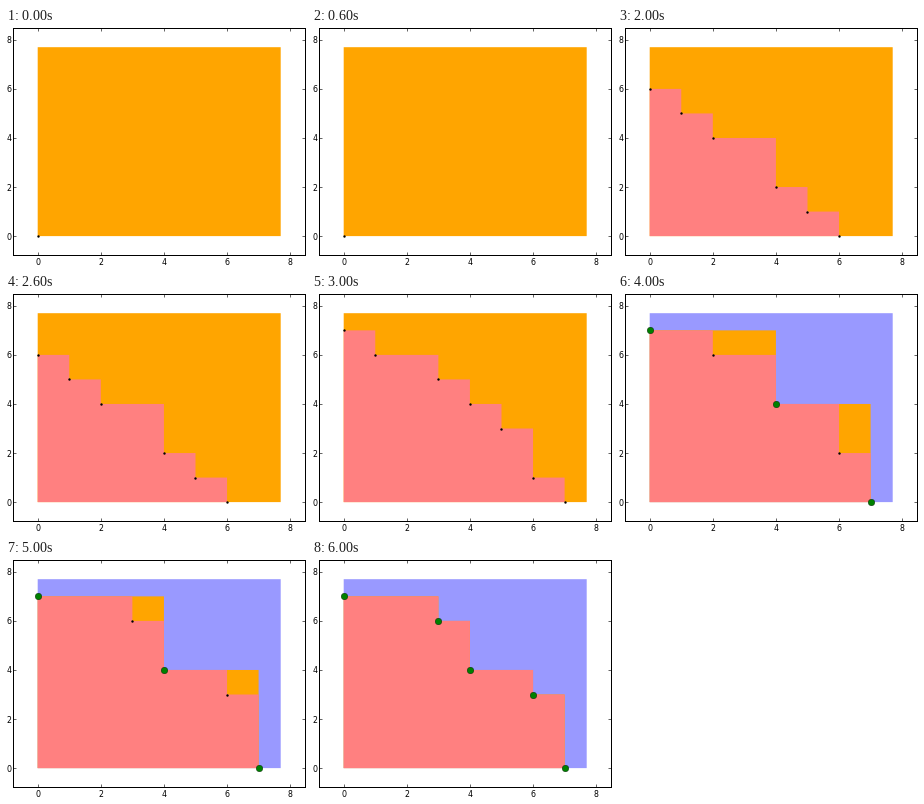
Animation of 300x238 px, one loop 7000 ms. Source, as a matplotlib script:

```python
import matplotlib.pyplot as plt
from matplotlib.animation import FuncAnimation

W, H, DPI = 300, 238, 64
PX = 72 / DPI  # points per pixel
SIZE = 7.7
STEPS = 7
ORANGE, PINK, BLUE = "orange", "#ff8080", "#9999ff"
LEFT, RIGHT, TOP, BOTTOM = 7.4, 299, 0.3, 227  # axes edges in pixels

plt.rcParams["font.family"] = "DejaVu Sans"
fig = plt.figure(figsize=(W / DPI, H / DPI), dpi=DPI, facecolor="white")
ax = fig.add_axes([LEFT / W, 1 - BOTTOM / H,
                   (RIGHT - LEFT) / W, (BOTTOM - TOP) / H])
ax.set(xlim=(-0.1 * SIZE, 1.1 * SIZE), ylim=(-0.1 * SIZE, 1.1 * SIZE),
       xticks=range(0, 9, 2), yticks=range(0, 9, 2))
ax.tick_params(direction="in", top=True, right=True, length=2.6 * PX,
               width=0.6 * PX, pad=2.6 * PX, labelsize=7.85 * PX)
ax.tick_params(axis="y", pad=2 * PX)
for spine in ax.spines.values():
    spine.set_linewidth(PX)


def region(color, z):
    return ax.fill([0, SIZE, SIZE, 0], [0, 0, SIZE, SIZE],
                   color=color, lw=0, zorder=z, snap=False)[0]


def dots(color, size, edge=0):
    return ax.plot([], [], "o", color=color, ms=size * PX, mew=edge * PX,
                   mec="black", zorder=5, clip_on=False)[0]


def mirror(half):
    """Complete a front that is symmetric about the diagonal."""
    return sorted(set(half) | {(y, x) for x, y in half})


def front(step):
    """Lower bound: a rising diagonal, then a corner sliding to the right."""
    if step < 3:
        total = (0, 4, 6)[step]
        return mirror([(x, total - x) for x in range(min(total // 2, 2) + 1)])
    half = [(0, 7), (min(step - 2, 3), 6), (4, 4)]
    if step == 3:
        half.append((3, 5))
    return mirror(half)


def optimal(step):
    """Points already proven to lie on the final front."""
    if step < 4:
        return []
    return front(step) if step == STEPS - 1 else mirror([(0, 7), (4, 4)])


def stairs(points):
    """Outline of the area below a descending staircase."""
    outline = [(0, 0)]
    for (x, y), (x_next, _) in zip(points, points[1:]):
        outline += [(x, y), (x_next, y)]
    return outline + [(points[-1][0], 0)]


square = region(ORANGE, 1)
between = region(ORANGE, 2)
below = region(PINK, 3)
open_dots = dots("black", 2.4)
done_dots = dots("green", 6.6, 0.33)


def draw(step):
    lower, done = front(step), optimal(step)
    square.set_facecolor(BLUE if done else ORANGE)
    between.set_xy(stairs(done or [(0, 0)]))
    below.set_xy(stairs(lower))
    pending = [p for p in lower if p not in done]
    for line, pts in ((open_dots, pending), (done_dots, done)):
        line.set_data([x for x, _ in pts], [y for _, y in pts])
    return square, between, below, open_dots, done_dots


anim = FuncAnimation(fig, draw, frames=STEPS, interval=1000,
                     repeat=True, repeat_delay=0)
plt.show()
```
